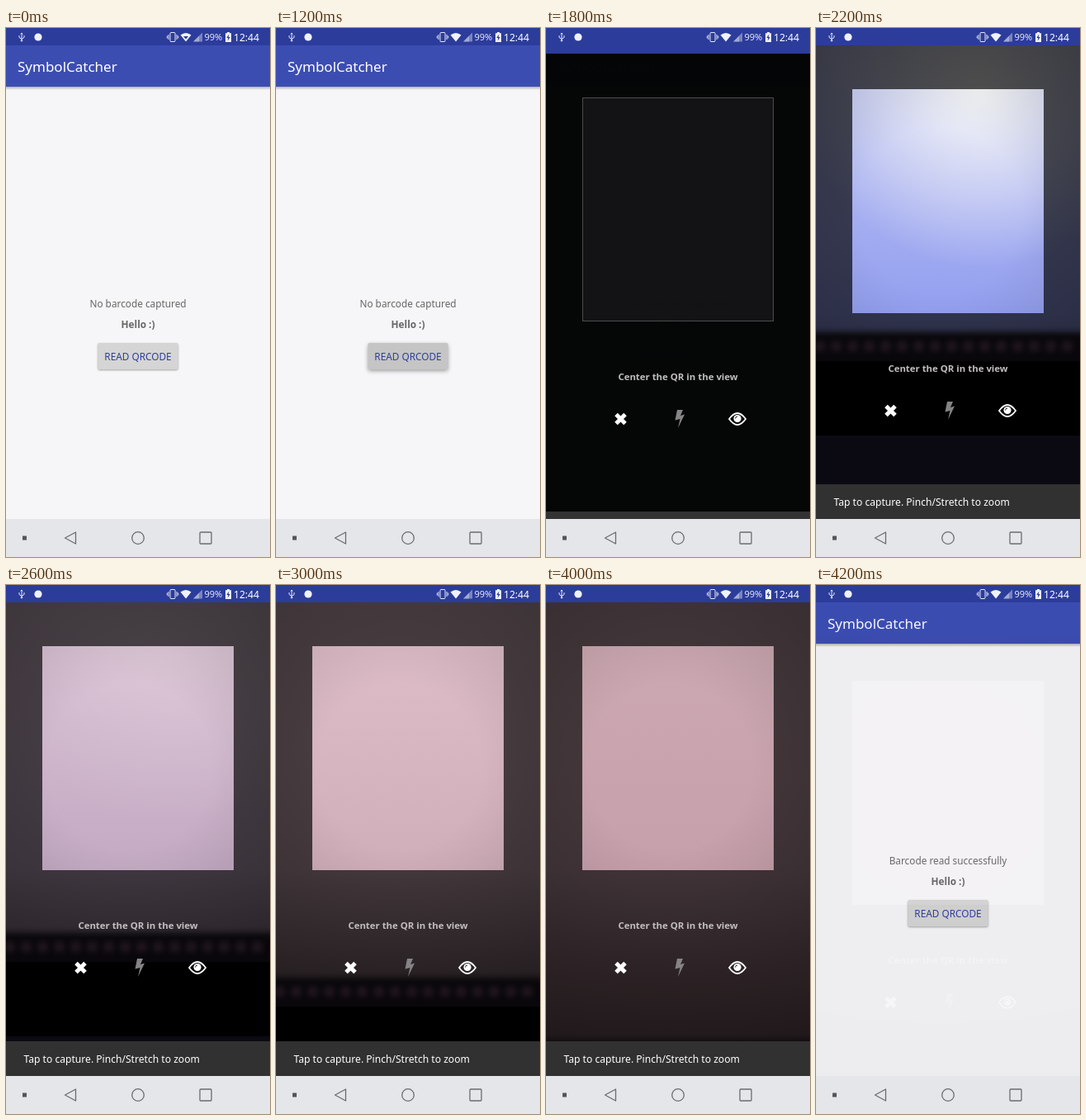
These frames come from a looping animation (320x640 px, 4.3 s). An HTML page:

```html
<!DOCTYPE html>
<html lang="en">
<head>
<meta charset="utf-8">
<title>Scanner app</title>
<style>
  html, body { margin: 0; height: 100%; overflow: hidden; background: #f6f6f8; }
  svg { display: block; width: 100%; height: 100%; }
  text { font: 11.8px "Noto Sans", "Open Sans", sans-serif; fill: #666; }
  .mid { text-anchor: middle; }
  .bold { font-weight: 600; }
</style>
</head>
<body>
<svg viewBox="0 0 320 640">
  <defs>
    <linearGradient id="wall" gradientUnits="userSpaceOnUse" x1="0" y1="21" x2="0" y2="594">
      <stop offset="0"/><stop offset=".565"/><stop offset="1"/>
    </linearGradient>
    <radialGradient id="light" gradientUnits="userSpaceOnUse" cx="200" cy="70" r="220">
      <stop offset="0" stop-color="#fffff8"/><stop offset="1" stop-color="#fffff8" stop-opacity="0"/>
    </radialGradient>
    <radialGradient id="vignette" gradientUnits="userSpaceOnUse" cx="150" cy="220" r="400">
      <stop offset=".25" stop-opacity="0"/><stop offset="1" stop-opacity=".3"/>
    </radialGradient>
    <linearGradient id="shade" x2="0" y2="1">
      <stop offset="0" stop-opacity=".28"/><stop offset="1" stop-opacity="0"/>
    </linearGradient>
    <filter id="soft" x="-20%" width="140%"><feGaussianBlur stdDeviation="3.5"/></filter>
  </defs>

  <g id="home">
    <rect width="320" height="640" fill="#f6f6f8"/>
    <rect y="71" width="320" height="4" fill="url(#shade)"/>
    <rect y="21" width="320" height="50" fill="#3c4db2"/>
    <text x="14" y="53" style="font-size:17px;fill:#fff">SymbolCatcher</text>
    <text id="status" class="mid" x="160" y="337.5"></text>
    <text class="mid bold" x="160" y="363">Hello :)</text>
    <rect id="button" x="111.5" y="381" width="97" height="32" rx="2"/>
    <text class="mid" x="160" y="401.8" style="fill:#303f9f">READ QRCODE</text>
  </g>

  <g id="scanner">
    <rect y="-60" width="320" height="81" fill="#2c3c9b"/>
    <rect y="21" width="320" height="640" fill="#030505"/>
    <rect x="44.5" y="74.5" width="231" height="270" fill="#111114" stroke="#4a4b4c"/>
    <g id="camera">
      <rect y="21" width="320" height="573" fill="url(#wall)"/>
      <rect id="glow" y="21" width="320" height="345" fill="url(#light)"/>
      <rect y="21" width="320" height="573" fill="url(#vignette)"/>
      <g id="desk">
        <g filter="url(#soft)">
          <rect x="-20" width="360" height="300" fill="#1c1524"/>
          <path d="M0 17H320" stroke="#6a4c64" stroke-width="9" stroke-dasharray="9 11"/>
        </g>
        <rect y="35" width="320" height="90"/>
        <rect y="125" width="320" height="130" fill="#221c36"/>
      </g>
      <path d="M0 21H320V594H0ZM44 74V345H276V74Z" fill-opacity=".67"/>
    </g>
    <text class="mid bold" x="160" y="416" style="font-size:11.4px;fill:#c2bec0">Center the QR in the view</text>
    <path d="M85 457.5l11 11m0-11l-11 11" stroke="#fff" stroke-width="5"/>
    <path d="M159 452h7l-3 7 5-1.5-8 16.5 2.5-11-6 1.5z" fill="#858385"/>
    <path d="M222 463Q232 449 242 463Q232 477 222 463Z" fill="none" stroke="#fff" stroke-width="1.8"/>
    <circle cx="232" cy="462.5" r="4.6" fill="#fff"/>
    <path d="M229.5 462.5a2.5 2.5 0 0 1 2.5-2.5" fill="none" stroke="#222"/>
    <g id="snack">
      <rect y="552" width="320" height="90" fill="#313131"/>
      <text x="21.5" y="577.8" style="font-size:12.1px;fill:#fff">Tap to capture. Pinch/Stretch to zoom</text>
    </g>
  </g>

  <!-- System bars -->
  <rect width="320" height="21" fill="#2c3c9b"/>
  <g fill="none" stroke="#e4e7f5">
    <path d="M19 6v10M16 9v2.5l3 2 3-2V9M17.8 7.5l1.2-1.5 1.2 1.5"/>
    <circle cx="19" cy="15.3" r=".8"/>
    <rect x="199" y="5.5" width="6" height="11" rx="1"/>
    <path d="M197 8v6M207 8v6M195.3 9.5v3M208.7 9.5v3"/>
  </g>
  <g fill="#f0f2fa">
    <circle cx="39" cy="11" r="4.6"/>
    <path d="M211.5 8.5Q218 3.5 224.5 8.5L218 16.5Z"/>
    <path id="traffic" d="M215 10h6l-3 3.5z" fill="#2c3c9b"/>
    <path d="M238 5.5V16.5H227Z" fill-opacity=".4"/>
    <path d="M234 9.5V16.5H227Z" fill-opacity=".35"/>
    <path d="M268 5h3v1.2h2v10.8h-7V6.2h2z"/>
  </g>
  <path d="M270.3 7.5l-3 4.5h2l-.6 3.5 3-4.5h-2z" fill="#2c3c9b"/>
  <text x="240.5" y="15" style="font-size:11px;fill:#e4e7f5">99%</text>
  <text x="276" y="15.5" style="font-size:12.1px;fill:#fff">12:44</text>
  <rect y="594" width="320" height="46" fill="#e4e6ea"/>
  <rect x="20" y="614.5" width="5" height="5" fill="#555"/>
  <g fill="none" stroke="#6c6c6e" stroke-width="1.3">
    <path d="M71.5 617L84.5 610V624Z" stroke-linejoin="round"/>
    <circle cx="160" cy="617" r="7.3"/>
    <rect x="235" y="610" width="14" height="14" rx="1"/>
  </g>
</svg>
<script>
const LOOP = 4300, STEP = 100;
const OPEN = 1700, CLOSE = 3965, SLIDE = 54;
const $ = id => document.getElementById(id);
const stops = document.querySelectorAll('#wall stop');
const ramp = (t, from, to) => Math.min(1, Math.max(0, (t - from) / (to - from)));
const move = (id, y) => $(id).setAttribute('transform', `translate(0 ${y})`);
const fade = (id, value) => $(id).setAttribute('opacity', value);

// Camera view: time, desk edge, glow, then the wall's top, middle and bottom colours
const views = [
  [2200, 368, .9, [192, 198, 242], [148, 160, 240], [64, 64, 96]],
  [2700, 434, 0, [224, 192, 203], [208, 174, 185], [84, 66, 72]],
  [3000, 475, 0, [223, 191, 201], [208, 174, 185], [84, 66, 72]],
  [3500, 546, 0, [206, 171, 180], [198, 160, 171], [118, 86, 94]],
  [4000, 551, 0, [205, 170, 179], [198, 160, 171], [118, 86, 94]]
];

function mix(a, b, k) {
  return Array.isArray(a) ? a.map((v, i) => mix(v, b[i], k)) : a + (b - a) * k;
}

function viewAt(t) {
  const found = views.findIndex(v => v[0] >= t);
  const next = found < 0 ? views.length - 1 : Math.max(1, found);
  const a = views[next - 1], b = views[next];
  return mix(a, b, ramp(t, a[0], b[0]));
}

function drawHome(t) {
  const press = ramp(t, 900, 1200) * (1 - ramp(t, 1500, 1700));
  const grey = 213 - 16 * press;
  $('button').style.fill = `rgb(${grey},${grey},${grey})`;
  $('button').style.filter =
    `drop-shadow(0 ${1 + 1.5 * press}px ${1 + 1.5 * press}px rgba(0,0,0,.35))`;
  $('status').textContent = t < 4000 ? 'No barcode captured' : 'Barcode read successfully';
  fade('traffic', t < 700 ? 1 : 0);
}

function drawScanner(t) {
  const enter = (1 - ramp(t, OPEN, OPEN + 350)) ** 5;
  const leave = ramp(t, CLOSE, CLOSE + 250) ** 4;
  const shown = 1 - (1 - ramp(t, OPEN, OPEN + 150)) ** 4;
  const gone = ramp(t, CLOSE + 90, CLOSE + 240);
  move('scanner', Math.round(SLIDE * (enter + leave)));
  fade('scanner', shown * (1 - gone));
  move('snack', 42 * (1 - ramp(t, 1735, 1985)) ** 2);

  const [, edge, glow, ...wall] = viewAt(t);
  wall.forEach((c, i) => stops[i].setAttribute('stop-color', `rgb(${c.map(Math.round)})`));
  move('desk', edge);
  fade('glow', glow);
  fade('camera', ramp(t, 1900, 2100));
}

function frame(now) {
  const t = Math.floor(now % LOOP / STEP) * STEP;
  drawHome(t);
  drawScanner(t);
  requestAnimationFrame(frame);
}
frame(0);
</script>
</body>
</html>
```
